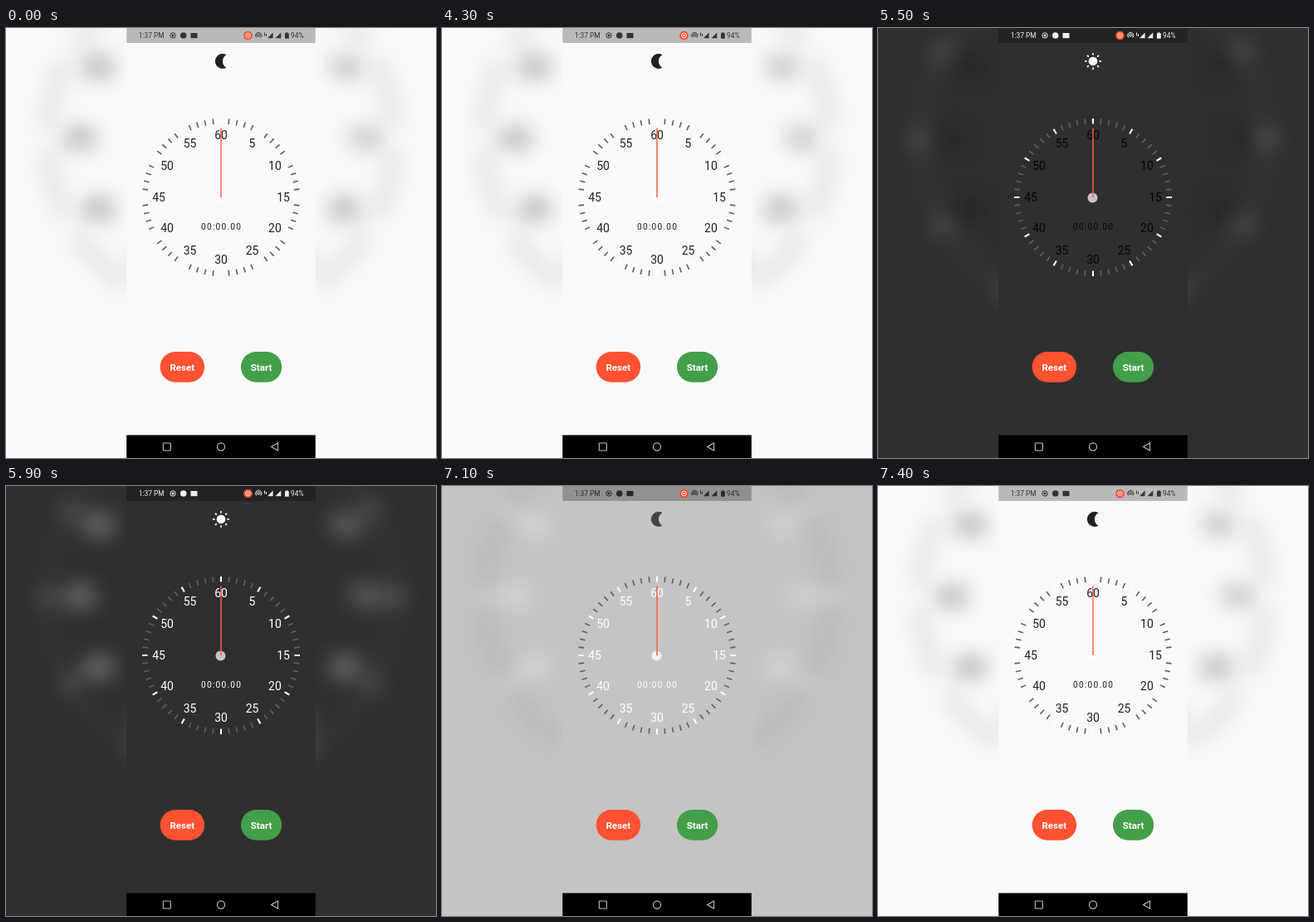
Write an HTML page that moves like this. It is 518 by 518 pixels and loops after 8000 ms.

```html
<!DOCTYPE html>
<html lang="en">
<head>
<meta charset="utf-8">
<title>Stopwatch theme switch</title>
<style>
  html, body { margin: 0; width: 100%; height: 100%; overflow: hidden; }

  svg {
    --bg: #f9f9f9;
    --ink: rgba(0, 0, 0, .87);
    --icon: #202020;
    --status: rgba(0, 0, 0, .72);
    --sun: 0;
    --moon: 1;
    display: block;
    width: 100vw;
    height: 100vh;
    font-family: Roboto, Arial, sans-serif;
    animation: theme 8s step-end infinite;
  }

  /* Background and icon change first, the label colour follows. */
  @keyframes theme {
    67.5%  { --bg: #a4a4a4; --icon: #787878; --status: #eee; --sun: 1; --moon: 0; }
    68.75% { --bg: #2f2f2f; --icon: #fff; --ink: rgba(0, 0, 0, .87); }
    70%    { --ink: #d8d8d8; }
    72.5%  { --ink: #f4f4f4; }
    73.75% { --ink: #fff; --bg: #2f2f2f; --icon: #fff; --status: #eee; --sun: 1; --moon: 0; }
    87.5%  { --bg: #2f2f2f; --icon: #fff; --status: rgba(0, 0, 0, .72); --sun: 0; --moon: 1; }
    88.75% { --bg: #c4c4c4; --icon: #444; --ink: #fff; }
    90%    { --bg: #f9f9f9; --icon: #202020; --ink: #c6c6c6; }
    91.25% { --ink: #575757; }
    92.5%  { --bg: #f9f9f9; --icon: #202020; --ink: rgba(0, 0, 0, .87); --status: rgba(0, 0, 0, .72); --sun: 0; --moon: 1; }
  }

  text { text-anchor: middle; }
  .bg { fill: var(--bg); }
  .label { fill: var(--ink); font-size: 14px; }
  .clock { fill: var(--ink); font-size: 10.2px; letter-spacing: 1.2px; }
  .ticks { fill: none; stroke-width: 6.6; }
  .button { fill: #fff; font-size: 11.6px; font-weight: 700; }
  .sun { fill: var(--icon); stroke: var(--icon); opacity: var(--sun); }
  .moon { fill: var(--icon); opacity: var(--moon); }
  .status { fill: var(--status); font-size: 8.4px; }
  .status text { text-anchor: start; }
  .line { fill: none; stroke: var(--status); }
  .nav { fill: none; stroke: #c2c2c2; stroke-width: 1.1; }
</style>
</head>
<body>
<svg viewBox="0 0 518 518">
  <defs>
    <filter id="blur" filterUnits="userSpaceOnUse" x="-60" y="-140" width="640" height="720" color-interpolation-filters="sRGB">
      <feGaussianBlur stdDeviation="13"/>
    </filter>
    <g id="dial">
      <circle class="ticks" cx="259" cy="204" r="91.7" pathLength="60" stroke="#606060"
        stroke-dasharray="0 .915 .17 .83 .17 .83 .17 .83 .17 .915"/>
      <circle class="ticks" cx="259" cy="204" r="91.7" pathLength="60" stroke="#fff"
        stroke-dasharray=".22 4.78" stroke-dashoffset=".11"/>
      <g id="labels"></g>
    </g>
  </defs>

  <rect class="bg" width="518" height="518"/>
  <g filter="url(#blur)">
    <use href="#dial" transform="translate(259 259) scale(2.28) translate(-259 -259)"/>
  </g>

  <rect class="bg" x="145.2" width="227.6" height="518"/>
  <rect x="145.2" width="227.6" height="18" fill="#000" opacity=".26"/>

  <g class="status">
    <text x="159.8" y="12">1:37 PM</text>
    <circle class="line" cx="201" cy="9" r="3.2"/>
    <circle cx="201" cy="9" r="1.5"/>
    <circle cx="213.7" cy="9" r="3.8"/>
    <path d="M222.5 6h8v6.2h-8z"/>
    <circle cx="291.5" cy="9" r="5.3" fill="#ff4b2e"/>
    <circle cx="291.5" cy="9" r="2.9" fill="none" stroke="#fff" stroke-width=".9"/>
    <circle cx="291.5" cy="9" r="1.1" fill="#fff"/>
    <path class="line" d="M301.8 11.6a3.6 3.6 0 1 1 5 0M303 10.2a1.8 1.8 0 1 1 2.6 0"/>
    <circle cx="304.3" cy="9.6" r=".9"/>
    <path d="M311 5.5h1v4h-1zM313 7h1v3h-1z"/>
    <path d="M315 12.3l6.6-6.8v6.8zM324.5 12.3l6.8-6.8v6.8z"/>
    <path d="M336 6.2h1.4v-1h2v1h1.4v6.5H336z"/>
    <text x="343" y="12">94%</text>
  </g>

  <path class="moon" transform="translate(248.3 29.2) scale(.9)"
    d="M14 2c1.82 0 3.53.5 5 1.35-2.99 1.73-5 4.95-5 8.65s2.01 6.92 5 8.65C17.53 21.5 15.82 22 14 22 8.48 22 4 17.52 4 12S8.48 2 14 2z"/>
  <g class="sun">
    <circle cx="259" cy="40" r="5.3" stroke="none"/>
    <circle cx="259" cy="40" r="8.6" fill="none" stroke-width="2.4" pathLength="8"
      stroke-dasharray=".27 .73" stroke-dashoffset=".135"/>
  </g>

  <use href="#dial"/>
  <text class="clock" x="259.6" y="242.6">00:00.00</text>
  <circle cx="258.5" cy="204.5" r="6" fill="#fff" opacity=".72"/>
  <path d="M259 120.5V204" stroke="#fb5f3c" stroke-width="1.5"/>

  <rect x="185.7" y="390" width="53.4" height="36.7" rx="18.3" fill="#ff5232"/>
  <text class="button" x="212.3" y="412.6">Reset</text>
  <rect x="283" y="390" width="49.2" height="36.7" rx="18.3" fill="#439f4a"/>
  <text class="button" x="307.5" y="412.6">Start</text>

  <rect x="145.2" y="490.4" width="227.6" height="27.6" fill="#000"/>
  <g class="nav">
    <rect x="189.3" y="500" width="9" height="9" rx=".6"/>
    <circle cx="259" cy="504.5" r="4.6"/>
    <path d="M319.6 504.5l8-4.6v9.2z"/>
  </g>
</svg>
<script>
  const labels = document.getElementById('labels');
  for (let n = 5; n <= 60; n += 5) {
    const angle = n * Math.PI / 30;
    const label = document.createElementNS(labels.namespaceURI, 'text');
    label.setAttribute('class', 'label');
    label.setAttribute('x', 259 + 75 * Math.sin(angle));
    label.setAttribute('y', 208.5 - 75 * Math.cos(angle));
    label.textContent = n;
    labels.append(label);
  }
</script>
</body>
</html>
```
